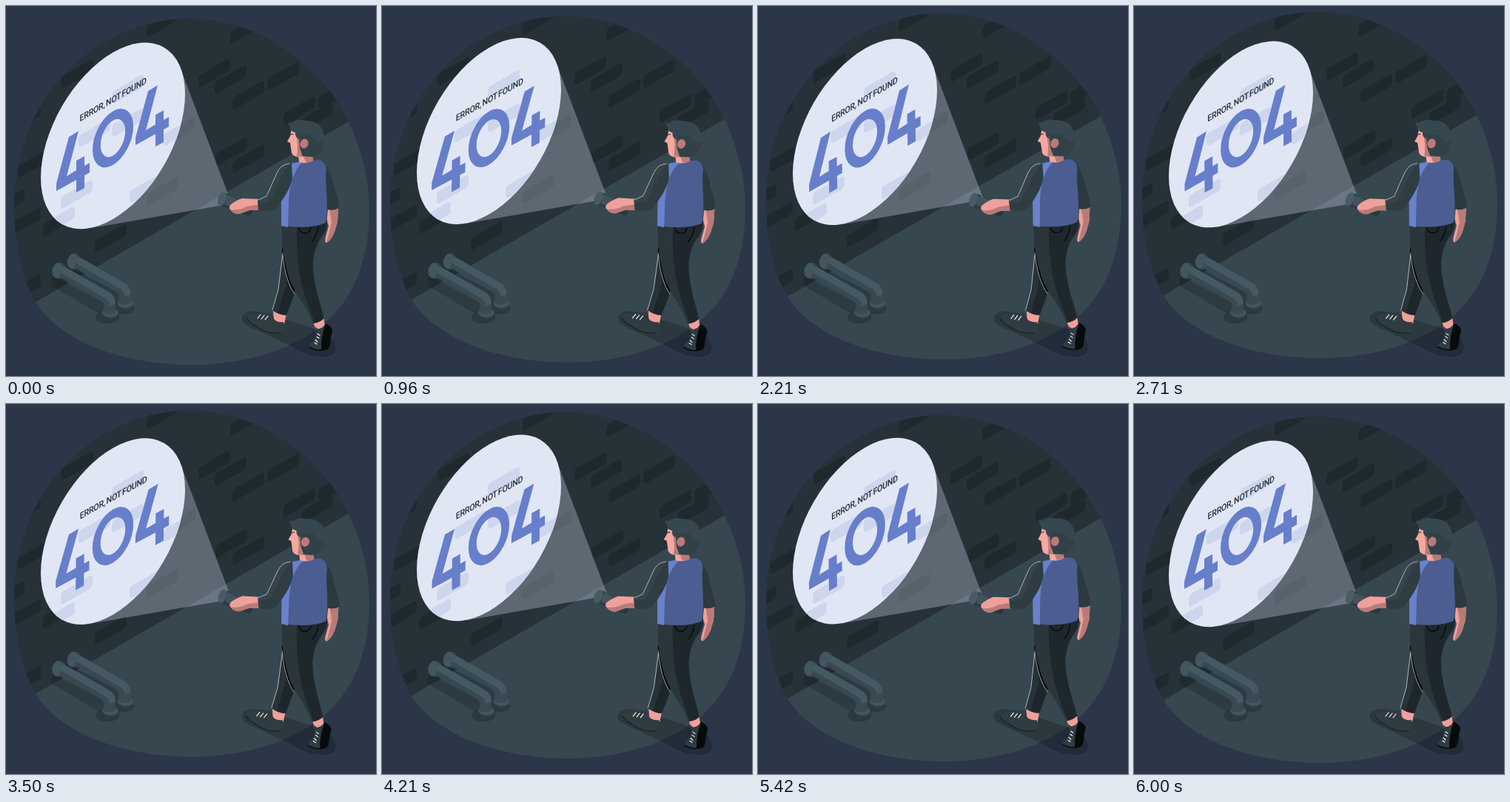
Write an HTML page that moves like this. It is 500 px wide and 500 px high and loops after 6040 ms.

```html
<!DOCTYPE html>
<html lang="en">
<head>
<meta charset="utf-8">
<title>404</title>
<style>
html, body { margin: 0; width: 100%; height: 100%; overflow: hidden; background: #2b3648; }
svg { display: block; width: 100%; height: 100%; }
text { font: 500 12.2px Roboto, Inter, sans-serif; letter-spacing: -.25px; word-spacing: -1px; fill: #263238; }
.line { fill: none; stroke-linecap: round; stroke-linejoin: round; }
</style>
</head>
<body>
<svg viewBox="0 0 500 500">
  <defs>
    <clipPath id="blob"><path d="M248 17C330 17 405 65 445 125C475 170 491 225 491 275C491 350 466 410 408 445C360 475 300 485 250 485C170 485 85 460 45 408C20 370 11 320 11 270C11 215 25 170 50 130C90 65 165 17 248 17Z"/></clipPath>
    <clipPath id="spot"><circle r="112.6" transform="matrix(.866 -.5 0 1 144.5 175.4)"/></clipPath>
    <path id="brick" d="M4 20Q0 23 0 27V33Q0 39 4 37L39 17Q43 14 43 10V3Q43-2 39 0Z"/>
    <path id="four" d="M85 177L98 169L82 230L95 222V209L106 203V216L113 212V225L106 229V246L95 252V235L68 250V240Z"/>
    <g id="pipe">
      <path d="M62 364V378L126 416L140 404Z" opacity=".18"/>
      <ellipse cx="137" cy="421" rx="16" ry="8.5" opacity=".2"/>
      <ellipse cx="141" cy="417" rx="10.5" ry="6" fill="#2f3e45"/>
      <ellipse cx="141" cy="414.500" rx="10.5" ry="6" fill="#42565f"/>
      <ellipse cx="73" cy="358" rx="7.5" ry="11" fill="#33434a" transform="rotate(12 73 358)"/>
      <ellipse cx="69.500" cy="357.500" rx="7" ry="10.500" fill="#42565f" transform="rotate(12 69.500 357.500)"/>
      <path d="M77 351L138 386Q148 391 148 402V414Q140 419 132 414V403Q131 400 128 398L72 366Z" fill="#384951"/>
      <path d="M77 351L138 386Q148 391 148 402L140 405Q140 399 134 395L74 360Z" fill="#445963"/>
    </g>
  </defs>

  <g id="room" clip-path="url(#blob)">
    <rect width="500" height="500" fill="#263238"/>
    <g id="darkBricks" fill="#1e292e"></g>
    <path d="M0 423L500 135V500H0Z" fill="#37474f"/>
  </g>

  <use href="#pipe" x="20.5" y="-12.5"/>
  <use href="#pipe"/>

  <g id="beam">
    <path d="M236 84.7L305 267L112 300.7Z" fill="#dbe3f8" opacity=".3"/>
    <g clip-path="url(#spot)">
      <rect x="40" y="40" width="210" height="270" fill="#e1e6f5"/>
      <g id="paleBricks" fill="#ced6ee"></g>
    </g>
  </g>

  <g id="sign">
    <text transform="matrix(.866 -.5 0 1 99.500 156.500)">ERROR, NOT FOUND</text>
    <g fill="#677fca">
      <use href="#four"/>
      <use href="#four" x="107" y="-62"/>
      <ellipse rx="25.500" ry="30" transform="matrix(.866 -.5 0 1 144.500 178.500)" fill="none" stroke="#677fca" stroke-width="12.500"/>
    </g>
  </g>

  <path d="M319 420C322 410 345 410 365 420L430 440C447 450 450 468 440 472C425 477 405 472 390 462L345 441C325 432 317 428 319 420Z" opacity=".21"/>

  <g id="man">
    <!-- far arm -->
    <path d="M435 274L449 273C448 285 449 291 446 298C444 307 440 316 433 320Q430 319 432 312L436 297Q433 291 434 284Z" fill="#f0a09a"/>
    <path d="M437 274L449 273C448 285 449 291 446 298C444 307 440 316 433 320Q437 306 440 292Z" fill="#b97b78"/>
    <path d="M429 212C439 220 441 235 444 246Q449 260 450 273Q443 277 434 275L430 245Z" fill="#2c393f"/>

    <!-- near foot -->
    <path d="M361 409L379 416L376 430L362 427Z" fill="#f0a09a"/>
    <path d="M326 419C330 414 349 417 358 413Q360 421 364 425Q369 428 375 427C377 431 375 441 370 444C355 445 345 439 335 432Q325 428 326 419Z" fill="#2f3c42"/>
    <path class="line" d="M326 422Q329 429 337 432C350 441 358 443 371 442" stroke="#1a2226" stroke-width="1.500"/>
    <path class="line" d="M340 422L344 417M345 423L349 418M350 424L354 419" stroke="#fff" stroke-width="1.1"/>

    <!-- far foot -->
    <path d="M414 424L429 418L431 433L419 438Z" fill="#f0a09a"/>
    <path d="M418 433Q421 438 426 436Q429 433 432 429Q442 434 441 440C437 450 440 459 435 463Q422 468 410 461Q409 457 417 451Q420 443 418 433Z" fill="#2f3c42"/>
    <path d="M432 429Q442 434 441 440C437 450 440 459 435 463Q430 466 426 465Q425 449 432 429Z" fill="#080b0c"/>
    <path class="line" d="M410 461Q422 468 435 463" stroke="#080b0c" stroke-width="1.5"/>
    <path class="line" d="M421 443L424 445M420 447L423 449M418 451L421 454M417 455L420 457" stroke="#fff" stroke-width="1.1"/>

    <!-- trousers -->
    <path d="M375 325L369 380L360 411Q369 418 379 418L391 386L389 340Z" fill="#1d272b"/>
    <path d="M375 325L369 380L360 411L367 415L379 375Z" fill="#273338"/>
    <path d="M373 325Q373 362 389 388L391 378L380 340Z"/>
    <path d="M373 295C372 325 376 345 382 366C388 386 409 408 415 429Q424 428 430 422C424 400 416 377 415 353C414 340 419 322 426 313Q434 304 434 290Z" fill="#1e282c"/>
    <path d="M373 295C372 325 376 345 382 366C388 386 409 408 415 429L417 428C405 396 391 365 393 296Z" fill="#2a363b"/>
    <path class="line" d="M374 334L368 383L360 411M374 337C376 359 382 378 390 389" stroke="#e4e9ec" stroke-width=".7"/>
    <path class="line" d="M396 300Q397 307 404 307Q410 307 412 300M422 299Q420 310 414 318" stroke="#050708" stroke-width="1.300"/>

    <!-- vest -->
    <path d="M385 213L397 210L424 208Q432 211 433 220C430 240 437 262 432 293Q411 302 372 297V262C379 245 383 230 385 213Z" fill="#4c5d92"/>
    <path d="M385 213L402 210C388 222 384 240 382 262L381 299L372 297V262C379 245 384 230 385 213Z" fill="#6a82cc"/>

    <!-- head -->
    <path d="M395 201H414L415 209Q406 214 396 211Z" fill="#f5a8a0"/>
    <path d="M402 203H414L415 209Q411 212 405 211Z" fill="#b97b78"/>
    <path d="M386 166L397 171L401 204Q389 205 386 199L384 185L380 183L384 176Z" fill="#f5a8a0"/>
    <path d="M391 172L400 176L402 204L393 203Q396 187 391 172Z" fill="#b97b78"/>
    <path d="M382 157Q386 159 389 156C395 153 400 154 404 155C420 154 430 164 430 178C431 193 426 202 415 204L401 203L397 192L396 180Q390 177 391 171Q383 169 384 163Q381 161 382 157Z" fill="#37474f"/>
    <path d="M391 171Q396 172 399 178L398 191L401 203H415C424 201 429 194 430 183Q418 187 414 174Q402 176 391 171Z" fill="#324148"/>
    <ellipse cx="403" cy="186" rx="5.500" ry="6.500" fill="#b97b78" transform="rotate(18 403 186)"/>
    <path class="line" d="M384 174L388 173" stroke="#263238" stroke-width="1.100"/>

    <!-- torch and near arm -->
    <path d="M296 253L307 260L333 275Q333 282 328 284L305 275L295 271Z" fill="#2b383e"/>
    <ellipse cx="297" cy="262.500" rx="6" ry="9.500" fill="#2f3d44" transform="rotate(20 297 262.500)"/>
    <ellipse cx="292" cy="260.500" rx="5.500" ry="9.500" fill="#4a5b65" transform="rotate(20 292 260.500)"/>
    <path d="M299 255L312 262L306 273L296 268Z" fill="#42535d"/>
    <path d="M342 261L319 260Q312 262 304 268Q300 272 303 275Q307 281 315 281L329 276L343 276Z" fill="#f0a09a"/>
    <path d="M303 275Q307 281 315 281L329 276L343 276V268L325 271Q314 277 303 275Z" fill="#b97b78"/>
    <path d="M386 213C375 213 370 218 366 226L352 257L340 262L341 276Q359 279 366 272C374 262 385 246 387 232Z" fill="#2f3d43"/>
    <path d="M386 213C375 213 370 218 366 226L352 257L340 262V267L356 263C366 250 370 224 386 213Z" fill="#35444b"/>
    <path class="line" d="M383 213C374 214 370 218 366 226L352 257L341 262" stroke="#dfe5e8" stroke-width=".7"/>
  </g>
</svg>
<script>
const $ = id => document.getElementById(id);
const LOOP = 6040;

const lay = (id, spots) => {
  $(id).innerHTML = spots.map(([x, y]) => `<use href="#brick" x="${x}" y="${y}"/>`).join('');
};
lay('darkBricks', [
  [190, 4], [303, 13], [260, 72], [282, 81], [306, 102], [353, 76], [375, 123], [422, 101],
  [399, 131], [283, 178], [306, 188], [75, 73], [4, 134], [16, 194], [-18, 249], [4, 273],
  [50, 273], [120, 295], [4, 364], [190, 232], [213, 151]
]);
lay('paleBricks', [
  [143, 94], [143, 139], [98, 153], [74, 236], [50, 272], [167, 228], [190, 232], [213, 151]
]);

// Linear rise of 10 and back
const rise = (t, span) => -10 * (1 - Math.abs(2 * (t / span % 1) - 1));

// Linear sway: 0, +1, -1, 0 degrees
const sway = (t, span) => {
  const p = t / span % 1;
  return p < .25 ? 4 * p : p < .75 ? 2 - 4 * p : 4 * p - 4;
};

const move = (id, value) => $(id).setAttribute('transform', value);

function draw(now) {
  const t = now % LOOP, angle = sway(t, 3000);
  move('room', `translate(0 ${rise(t, 6000)})`);
  move('beam', `translate(0 ${rise(t, 3000)})`);
  move('sign', `rotate(${angle} 144 176)`);
  move('man', `rotate(${angle} 370 311)`);
  requestAnimationFrame(draw);
}
draw(performance.now());
</script>
</body>
</html>
```
